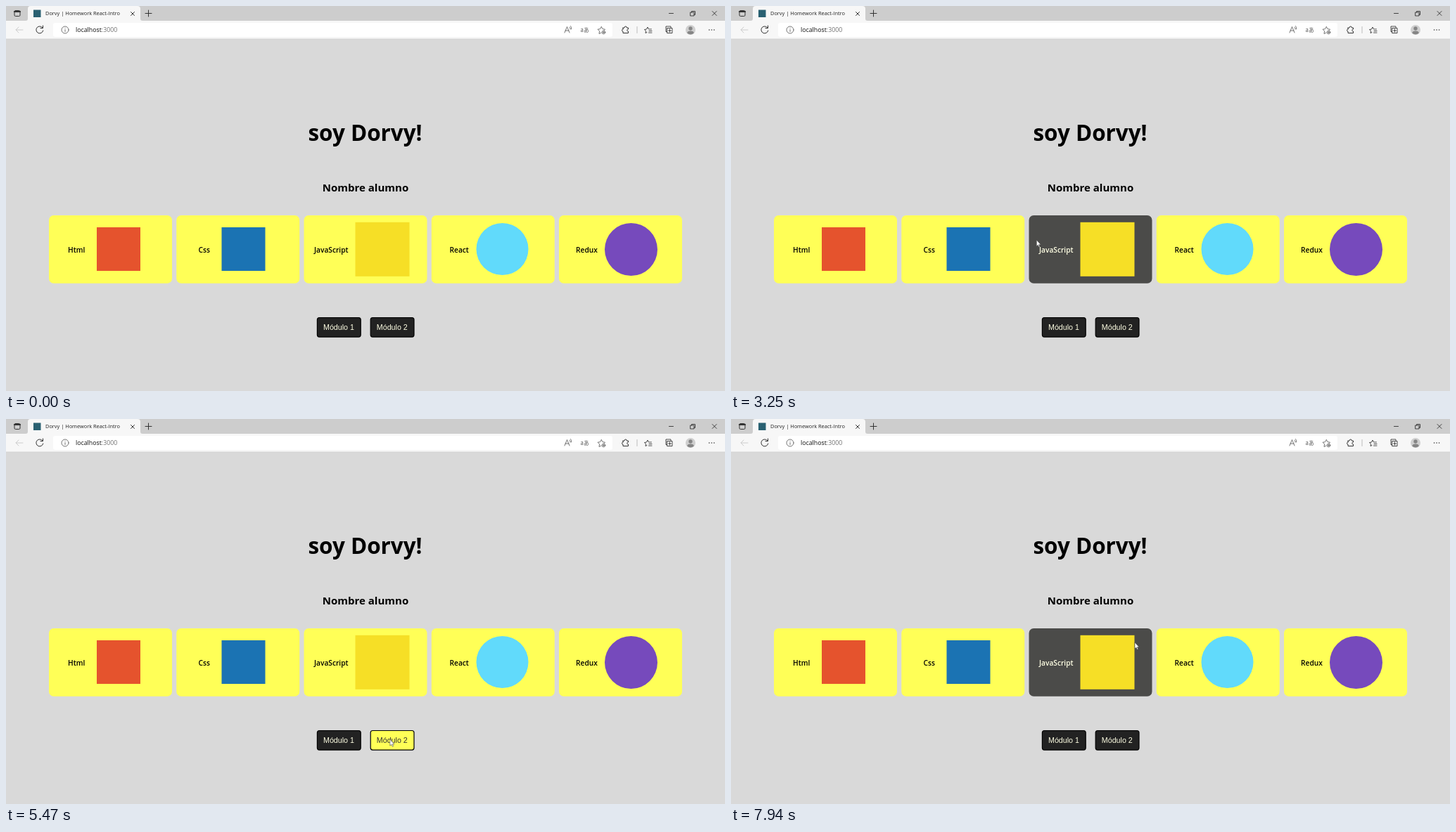
An HTML page for the animation above (8000 ms loop, 1022x548 px).

```html
<!DOCTYPE html>
<html lang="es">
<head>
<meta charset="utf-8">
<title>Homework React-Intro</title>
<style>
html, body { margin: 0; width: 100%; height: 100%; overflow: hidden; background: #d9d9d9; }
svg { position: absolute; left: 0; top: 0; }
svg, #dialog { font-family: "Open Sans", "Noto Sans", sans-serif; }
.icon { fill: none; stroke: #333; stroke-width: 1; stroke-linecap: round; stroke-linejoin: round; }
.card rect.face { fill: #ffff57; }
.card text { font-size: 10.2px; font-weight: 600; fill: #000; }
.card.hover rect.face { fill: #4b4b49; }
.card.hover text { fill: #ffffe4; }
.btn rect { fill: #222; stroke: #000; stroke-width: 1.2; }
.btn text { font: 10.7px "Liberation Sans", Arial, sans-serif; fill: #ffffe4; text-anchor: middle; }
.btn.hover rect { fill: #ffff57; }
.btn.hover text { fill: #333; }
#dialog {
  position: absolute; left: 361.5px; top: 38px; width: 300px; height: 84px;
  background: #f4f4f4; border-radius: 2px; box-shadow: 0 8px 18px rgba(0, 0, 0, .32);
}
#dialog * { position: absolute; left: 11.5px; white-space: nowrap; line-height: 12px; }
#dialog b { top: 11px; font-size: 8.9px; color: #222; }
#dialog span { top: 30px; font-size: 8.2px; color: #757575; }
#dialog i {
  left: 239px; top: 52px; width: 50px; height: 21px; border-radius: 1px;
  background: #4096d6; color: #fff; font: 700 7.4px/21px "Open Sans", sans-serif; text-align: center;
}
</style>
</head>
<body>
<svg width="1022" height="548" viewBox="0 0 1022 548">
  <rect width="1022" height="548" fill="#d9d9d9"/>
  <rect width="1022" height="21" fill="#cdcdcd"/>
  <rect y="21" width="1022" height="26" fill="#f7f7f7"/>
  <path d="M0 47H1022" stroke="#cacaca" stroke-width=".7"/>
  <path d="M28 21q3 0 3-3V4q0-4 4-4H187q4 0 4 4V18q0 3 3 3z" fill="#f7f7f7"/>
  <rect x="67" y="24" width="795" height="20" rx="3" fill="#fff"/>
  <rect x="39" y="5.500" width="10.500" height="10.500" fill="#2a6172"/>
  <text x="56" y="13.2" font-size="7.4" fill="#222">Dorvy | Homework React-Intro</text>
  <text x="99" y="37" font-size="8.8" fill="#111">localhost<tspan fill="#707070">:3000</tspan></text>

  <g class="icon">
    <rect x="12" y="6.5" width="8" height="8" rx="1.5"/>
    <path d="M12 8H20" stroke-width="2.2"/>
    <path d="M177.5 8.5l5 5m0-5l-5 5M198 10.5h9m-4.500-4.500v9"/>
    <path d="M942.500 10.500h6M1004 7.500l6 6m0-6l-6 6" stroke-width=".9"/>
    <path d="M973 9h5v5h-5zM974.500 9V7.500h5v5H978" stroke-width=".9"/>
    <path d="M24 34H14l4-4m-4 4l4 4" stroke="#ccc"/>
    <path d="M52 31a5 5 0 1 0 .8 4M52.500 28v3.500H49"/>
    <g stroke="#666" stroke-width=".9">
      <circle cx="84" cy="34" r="5"/>
      <path d="M84 33.500v3M84 31.300v.2"/>
      <path d="M794 38l3.500-8.500 3.500 8.500m-6-3h5M801 30q1.500 1 1 3M802.500 28.500q2 2 1 4.500"/>
      <path d="M846 38l-3 1.500.6-3.700-2.600-2.600 3.600-.5 1.700-3.400 1.700 3.400 3.500.5-1.500 1.500"/>
      <circle cx="849.500" cy="37.500" r="2.300"/>
      <path d="M848.500 37.500h2m-1-1v2"/>
    </g>
    <path d="M877 31h2q0-2 1.700-2t1.700 2h2.100v2q-1.700 0-1.700 1.500t1.700 1.500v2.500h-7.500V36q-1.500 0-1.500-1.500T877 33z"/>
    <path d="M897 29.500v9" stroke="#bbb"/>
    <path d="M911 37.500l-2 1 .5-3-2-2 3-.5 1.500-3 1.500 3h4M914 35.500h4M913.500 38h4.500" stroke-width=".9"/>
    <path d="M939.500 36.500h-1.500v-7.500h7v1.500M940 31.500h7v7h-7zM943.500 33v4m-2-2h4" stroke-width=".9"/>
    <path d="M999.500 34h.1M1003 34h.1M1006.500 34h.1" stroke-width="1.500"/>
  </g>
  <text x="816.500" y="36.800" font-size="7.800" fill="#555" font-family="Noto Sans CJK JP, Noto Sans CJK, sans-serif">aあ</text>
  <circle cx="973" cy="34" r="7" fill="#cfcfcf"/>
  <g fill="#858585"><circle cx="973" cy="32" r="2.700"/><path d="M968.300 38.800q0-3.300 4.700-3.300t4.700 3.300q-4.700 3.600-9.400 0z"/></g>

  <g text-anchor="middle" font-weight="700">
    <text x="510.500" y="191.500" font-size="31.400">soy Dorvy!</text>
    <text x="511" y="264" font-size="15">Nombre alumno</text>
  </g>
  <g id="page"></g>
</svg>
<div id="dialog"><b>localhost:3000 dice</b><span>Aprobado</span><i>Aceptar</i></div>
<svg width="1022" height="548">
  <path id="cursor" d="M0 0V9l2-1.800 1.400 3 1.400-.6-1.400-2.900h2.700z" fill="#fff" stroke="#444" stroke-width=".6"/>
</svg>
<script>
const LOOP = 8000, SHOW = 6370, CLOSE = 7220;
const el = id => document.getElementById(id);
const square = (x, y, s, color) => `<rect x="${x - s / 2}" y="${y - s / 2}" width="${s}" height="${s}" fill="${color}"/>`;
const disc = (x, y, r, color) => `<circle cx="${x}" cy="${y}" r="${r}" fill="${color}"/>`;

// label, label x, badge
const cards = [
  ["Html", 88, square(160, 346, 62, "#e5532d")],
  ["Css", 273.5, square(337.5, 346, 62, "#1b73b3")],
  ["JavaScript", 438, square(535, 346.3, 77, "#f6df26")],
  ["React", 630.5, disc(705.5, 346, 37, "#61dafb")],
  ["Redux", 810, disc(888.5, 346.5, 37.5, "#764abc")]
];
const boxes = [
  ...cards.map((c, i) => ({ x: 61 + i * 181.25, y: 298, w: 175, h: 96.8 })),
  ...[442.4, 518.2].map(x => ({ x, y: 443.5, w: 61.8, h: 27.6 }))
];
const FIRST_BUTTON = cards.length;

el("page").innerHTML = boxes.map((b, i) => {
  const rect = `<rect class="face" x="${b.x}" y="${b.y}" width="${b.w}" height="${b.h}" rx="${i < FIRST_BUTTON ? 6.7 : 3}"/>`;
  if (i >= FIRST_BUTTON)
    return `<g class="btn">${rect}<text x="${b.x + b.w / 2 - .3}" y="461">Módulo ${i - FIRST_BUTTON + 1}</text></g>`;
  const [label, x, badge] = cards[i];
  return `<g class="card">${rect}${badge}<text x="${x}" y="350.5">${label}</text></g>`;
}).join("");
const parts = [...el("page").children];

// time, x, y of the pointer tip
const path = [
  [340, 690, 484], [1120, 140, 80], [1200, 145, 85], [1590, 395, 150], [1840, 385, 160],
  [2310, 207, 301], [2630, 226, 332], [2700, 230, 334], [3250, 434, 333], [3320, 455, 333],
  [3490, 460, 333], [4270, 765, 337], [4360, 830, 338], [4600, 868, 362], [4800, 845, 402],
  [5150, 592, 440], [5230, 580, 445], [5470, 546, 456], [5870, 481, 464], [6670, 481, 464],
  [7060, 622, 101], [7290, 622, 101], [7940, 574, 318]
];

function pointer(t) {
  const i = path.findIndex(p => p[0] > t);
  if (i < 0) return path[path.length - 1].slice(1);
  const [t0, x0, y0] = path[i - 1], [t1, x1, y1] = path[i];
  const k = (t - t0) / (t1 - t0);
  return [x0 + (x1 - x0) * k, y0 + (y1 - y0) * k];
}

function draw(t) {
  const visible = t >= path[0][0];
  const [x, y] = visible ? pointer(t) : [-50, -50];
  const modal = t >= SHOW && t < CLOSE;
  el("cursor").setAttribute("transform", `translate(${x} ${y})`);
  boxes.forEach((b, i) => {
    const inside = x >= b.x && x < b.x + b.w && y >= b.y && y < b.y + b.h;
    parts[i].classList.toggle("hover", modal ? i === FIRST_BUTTON : inside);
  });
  const fade = Math.min(1, Math.max(0, 1 - (t - CLOSE) / 140));
  const tilt = 7 * Math.min(1, Math.max(0, 1 - (t - SHOW) / 140));
  const style = el("dialog").style;
  style.opacity = t < SHOW ? 0 : fade;
  style.transform = `perspective(1000px) rotateX(${tilt}deg)`;
}

const start = performance.now();
function tick() {
  draw((performance.now() - start) % LOOP);
  requestAnimationFrame(tick);
}
tick();
</script>
</body>
</html>
```
